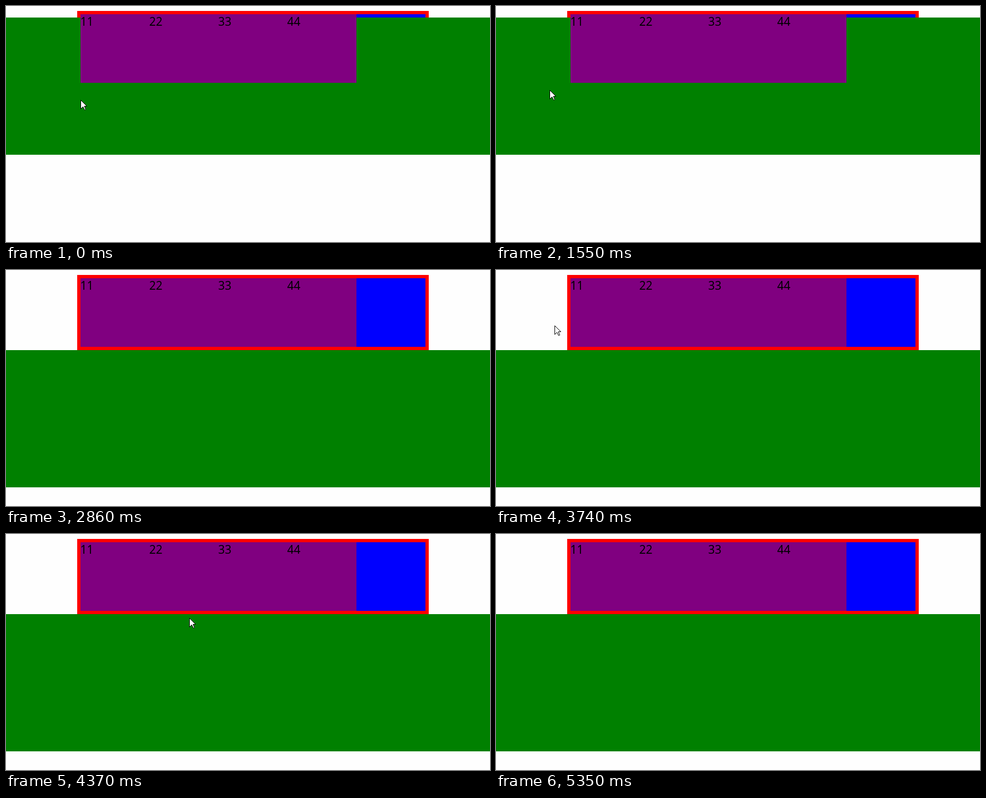
An HTML page for the animation above (6410 ms loop, 877 by 430 pixels).

```html
<!DOCTYPE html>
<html lang="en">
<head>
<meta charset="utf-8">
<title>Expanding container</title>
<style>
  html, body { margin: 0; width: 100%; height: 100%; overflow: hidden; background: #fefefe; }
  svg { display: block; width: 877px; height: 430px; }
  text { font: 21px "Noto Sans", "Open Sans", sans-serif; }
</style>
</head>
<body>
<svg viewBox="0 0 877 430" shape-rendering="crispEdges">
  <rect x="129" y="9" width="637" height="137" fill="#f00"/>
  <rect x="135" y="15" width="625" height="125" fill="#00f"/>
  <rect id="panel" width="877" height="250" fill="#008000"/>
  <rect x="135" y="15" width="500" height="125" fill="#800080"/>
  <g id="labels"></g>
  <path id="cursor" d="M.5.5V16.5L4.5 12.5 7.5 18.5 9.5 17.5 7 11.5H11.5Z"
        fill="#fff" stroke="#000" shape-rendering="auto"/>
</svg>
<script>
const LOOP = 6410, EXPAND = 2860, UNIT = 125;
const el = id => document.getElementById(id);
const panel = el('panel'), cursor = el('cursor');

el('labels').innerHTML = ['11', '22', '33', '44']
  .map((s, i) => `<text x="${134.5 + i * UNIT}" y="36">${s}</text>`).join('');

// A pointer move along a quadratic curve; straight if no bend is given
const move = (start, end, from, to, bend, power = 1) =>
  ({ start, end, from, to, power, bend: bend || from.map((v, i) => (v + to[i]) / 2) });

const moves = [
  move(30, 690, [135, 171], [125, 168], [150, 188]),
  move(690, 910, [125, 168], [113, 159]),
  move(1410, 2010, [113, 159], [0, 122], [85, 148]),
  move(3440, 3740, [5, 74], [106, 101]),
  move(3840, 4070, [106, 101], [285, 141]),
  move(4070, 4710, [285, 141], [320, 243], [380, 141], 1.4),
  move(4790, 5350, [320, 243], [238, 430])
];

function pointerAt(t) {
  const m = moves.filter(m => m.start <= t).pop() || moves[0];
  const span = (t - m.start) / (m.end - m.start);
  const p = Math.min(1, Math.max(0, span)) ** m.power, q = 1 - p;
  return m.from.map((v, i) => Math.round(q * q * v + 2 * q * p * m.bend[i] + p * p * m.to[i]));
}

function draw(t) {
  panel.setAttribute('y', t < EXPAND ? 146 - UNIT : 146);
  const visible = t < 2010 || (t >= 3440 && t < 5350);
  cursor.style.display = visible ? '' : 'none';
  cursor.setAttribute('transform', `translate(${pointerAt(t)})`);
}

const start = performance.now();
function tick(now) {
  draw(Math.max(0, now - start) % LOOP);
  requestAnimationFrame(tick);
}
draw(0);
requestAnimationFrame(tick);
</script>
</body>
</html>
```
